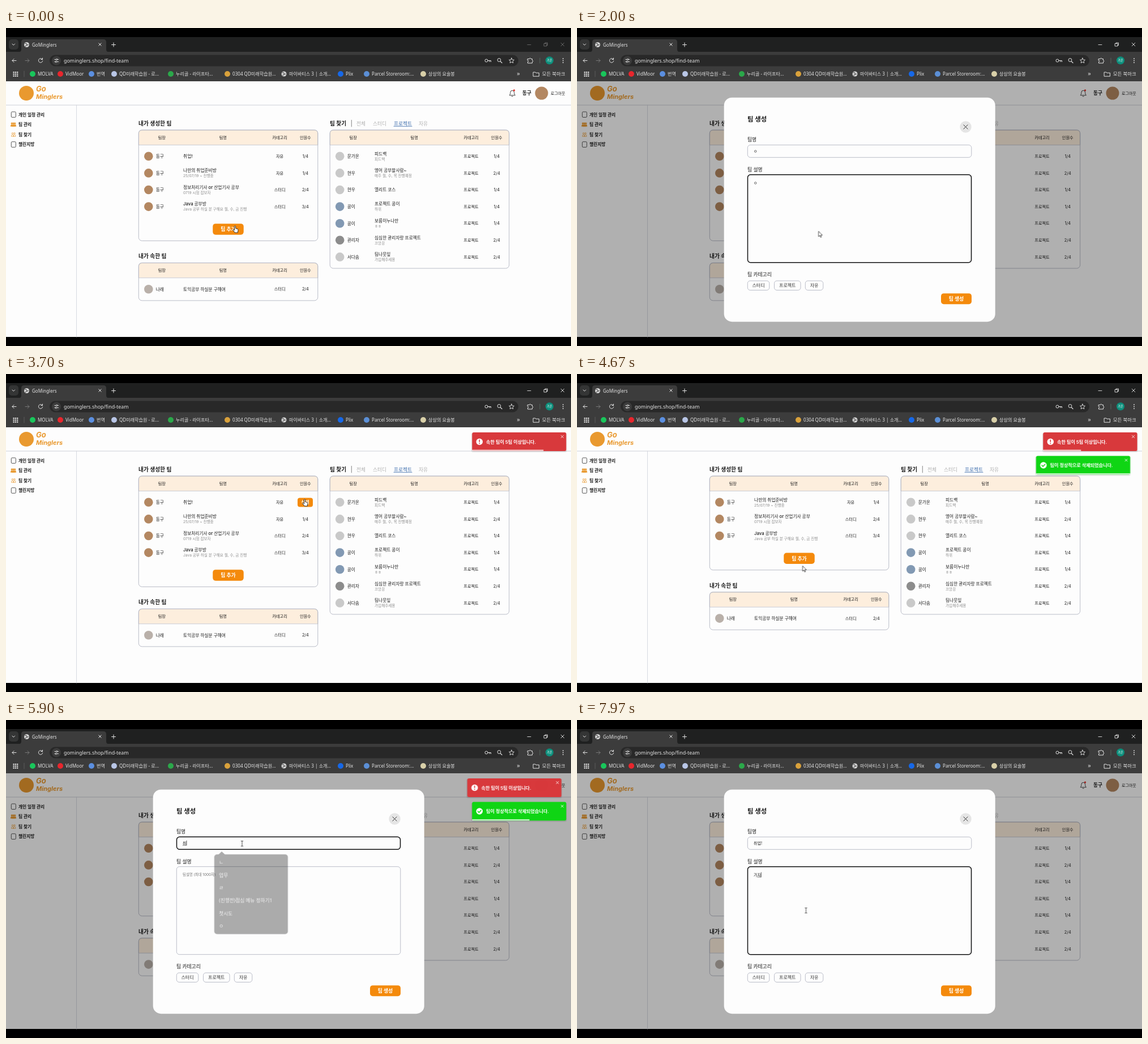
An HTML page that plays this animation: 998x561 px, repeating every 8000 ms.

```html
<!DOCTYPE html>
<html lang="ko">
<head>
<meta charset="utf-8">
<title>Find team</title>
<style>
  html, body { margin: 0; width: 100%; height: 100%; overflow: hidden; background: #000; }
  svg { display: block; width: 998px; height: 561px; }
  text { font-family: Inter, "Noto Sans CJK KR", "Noto Sans CJK", sans-serif; white-space: pre; }
  .ui { font-family: "Noto Sans", "Noto Sans CJK KR", "Noto Sans CJK", sans-serif; }
</style>
</head>
<body>
<script>
const LOOP = 8000;
const ORANGE = '#f48a0c', BRAND = '#e9992f', INK = '#1c1c1c', PAPER = '#fdfdfd', LINE = '#b3b6c2';
const SKIN = '#b38761', GREY = '#c9c9c9', BLUE = '#8299b3';
const MID = { 'text-anchor': 'middle' }, MEDIUM = { 'font-weight': 500 };
const SEMI = { 'font-weight': 600 }, BOLD = { 'font-weight': 700 };
const MODAL = [[150, 2560], [4860]];
const DELETED = 4250;

function el(parent, tag, attrs = {}, text) {
  const node = document.createElementNS('http://www.w3.org/2000/svg', tag);
  for (const key in attrs) node.setAttribute(key, attrs[key]);
  if (text !== undefined) node.textContent = text;
  return parent.appendChild(node);
}
const group = (parent, attrs) => el(parent, 'g', attrs);
const rect = (parent, x, y, width, height, fill, rx = 0, more = {}) =>
  el(parent, 'rect', { x, y, width, height, fill, rx, ...more });
const disc = (parent, cx, cy, r, fill, more = {}) => el(parent, 'circle', { cx, cy, r, fill, ...more });
const path = (parent, d, stroke, width = 1, fill = 'none') =>
  el(parent, 'path', { d, stroke, 'stroke-width': width, fill, 'stroke-linecap': 'round', 'stroke-linejoin': 'round' });
// y is the vertical middle of the line
const label = (parent, x, y, text, size, fill = INK, more = {}) =>
  el(parent, 'text', { x, y: y + size * 0.37, 'font-size': size, fill, ...more }, text);
const cross = (parent, x, y, r, color, width) =>
  path(parent, `M${x - r} ${y - r}L${x + r} ${y + r}M${x + r} ${y - r}L${x - r} ${y + r}`, color, width);

// steps: [ms, keyframe]; first and last values are held
function track(node, steps) {
  const frames = steps.map(([ms, frame]) => ({ ...frame, offset: ms / LOOP }));
  if (frames[0].offset > 0) frames.unshift({ ...frames[0], offset: 0, easing: 'linear' });
  if (frames.at(-1).offset < 1) frames.push({ ...frames.at(-1), offset: 1 });
  node.animate(frames, { duration: LOOP, iterations: Infinity });
  return node;
}
function show(node, ...ranges) {
  const hard = opacity => ({ opacity, easing: 'steps(1, end)' });
  const steps = ranges[0][0] > 0 ? [[0, hard(0)]] : [];
  for (const [from, to = LOOP] of ranges) {
    steps.push([from, hard(1)]);
    if (to < LOOP) steps.push([to, hard(0)]);
  }
  return track(node, steps);
}

const svg = el(document.body, 'svg', { viewBox: '0 0 998 561' });
rect(svg, 0, 0, 998, 561, '#000');
drawBrowser();
drawPage();
drawModal();
drawToast(103, '#d8393c', '속한 팀이 5팀 이상입니다.', '!', 2690, 3040, 5772);
const green = drawToast(144.5, '#0fd514', '팀이 정상적으로 삭제되었습니다.', '✓', 4286, 4831, 7571);
track(green, [[6200, { transform: 'translateY(0)', easing: 'ease' }], [6500, { transform: 'translateY(-41.5px)' }]]);
drawCursor();

function globe(parent, x, y) {
  disc(parent, x, y, 4.5, '#d5d5d5');
  path(parent, `M${x - 3} ${y - 2}q3 -1 3 1t3 1M${x - 2} ${y + 3}q1 -3 3 -2`, '#555', 1.2);
}

function drawBrowser() {
  const g = group(svg), W = '#e3e3e3', ui = { class: 'ui' };
  rect(g, 0, 16, 998, 27, '#1f2020');
  rect(g, 5, 20, 17, 18, '#343535', 5);
  path(g, 'M11 28l2.3 2.3l2.3 -2.3', W);
  path(g, 'M22 42.5q5 0 5 -5V25q0 -5 5 -5H172q5 0 5 5V37.5q0 5 5 5z', 'none', 0, '#3c3c3c');
  globe(g, 36.5, 29.5);
  label(g, 46, 30, 'GoMinglers', 8, W, ui);
  cross(g, 166, 29, 2.2, W);
  path(g, 'M186.5 29.5h7M190 26v7', W);
  const controls = color => {
    const c = group(g);
    path(c, 'M921 29.5h6', color, .9);
    path(c, 'M950.5 27.5h4.5v4.5h-4.5zM952 27.5v-1.5h4.5v4.5h-1.5', color, .9);
    cross(c, 983, 29, 2.8, color, .9);
    return c;
  };
  show(controls('#6d6d6d'), [0, 100]);
  show(controls(W), [100]);

  rect(g, 0, 42, 998, 52.5, '#3c3c3c');
  path(g, 'M18 57.5h-7m3 -3l-3 3l3 3', W);
  path(g, 'M34 57.5h7m-3 -3l3 3l-3 3', '#777');
  path(g, 'M64 55a3.7 3.7 0 1 0 .8 3M64.5 53v2.5h-2.5', W);
  rect(g, 77, 47.5, 828, 20, '#282828', 10);
  disc(g, 89, 57.5, 8, '#3c3c3c');
  path(g, 'M86 55.5h2M91 55.5h1.5M86 59.5h1M90 59.5h2.5', W);
  disc(g, 89.7, 55.5, 1.2, 'none', { stroke: W });
  disc(g, 88.3, 59.5, 1.2, 'none', { stroke: W });
  label(g, 102, 58, 'gominglers.shop/find-team', 8.9, W, ui);
  disc(g, 848.5, 57.5, 2.5, 'none', { stroke: W });
  path(g, 'M851 57.5h5.5v2M854 57.5v2', W);
  disc(g, 871, 56.5, 2.9, 'none', { stroke: W });
  path(g, 'M873.3 58.8l2.7 2.7', W, 1.2);
  path(g, 'M893 53l1.3 3l3.2 .3l-2.4 2.2l.7 3.2l-2.8 -1.7l-2.8 1.7l.7 -3.2l-2.4 -2.2l3.2 -.3z', W, .9);
  path(g, 'M921.5 54.5h3a1.3 1.3 0 0 1 2.6 0h2.4v2.6a1.3 1.3 0 0 1 0 2.6v2.3h-8v-2.3a1.3 1.3 0 0 0 0 -2.6z', W);
  path(g, 'M943 53v9', '#5d6f68', .8);
  disc(g, 960, 57.3, 7, '#0c8f7c');
  label(g, 960, 57.3, '가온', 5.2, '#fff', MID);
  for (const y of [54, 57.5, 61]) disc(g, 984, y, .9, W);

  for (let i = 0; i < 9; i++) rect(g, 12.5 + i % 3 * 3.3, 77 + (i / 3 | 0) * 3.3, 2.2, 2.2, W);
  path(g, 'M32 76v10', '#666', .8);
  const bookmarks = [
    [47, '#19c65b', 'MOLVA'], [96, '#e8262d', 'VidMoor'], [151, '#5b8fe0', '번역'],
    [191, '#b9c6e6', 'QD미래학습원 - 로...'], [291, '#2ba84a', '누리골 - 라이프타...'],
    [391, '#d9a13b', '0304 QD미래학습원...'], [491, null, '마이바티스 3 | 소개...'],
    [591, '#1668e8', 'Plix'], [637, '#5b8fd6', 'Parcel Storeroom:...'], [737, '#d8cfa8', '상상의 요술봉']
  ];
  for (const [x, color, name] of bookmarks) {
    if (color) disc(g, x, 81, 5, color); else globe(g, x, 81);
    label(g, x + 9, 81, name, 8.1, W, ui);
  }
  label(g, 905, 80, '»', 11, W, { ...ui, ...MID });
  path(g, 'M931.5 78h3.5l1 1.2h5.5v6h-10z', W);
  label(g, 947, 81, '모든 북마크', 8.4, W, ui);
}

function button(parent, cx, cy, w, h, text, size) {
  const g = group(parent);
  rect(g, cx - w / 2, cy - h / 2, w, h, ORANGE, Math.min(5, h / 4));
  label(g, cx, cy, text, size, '#fff', { ...MID, ...BOLD });
  return g;
}

// team: [leader, avatar colour, name, note, category, members]
function table(parent, x, y, height, teams) {
  rect(parent, x, y, 316.5, height, PAPER, 6);
  path(parent, `M${x} ${y + 26}v-20q0 -6 6 -6h304.5q6 0 6 6v20z`, LINE, .7, '#fdeedd');
  rect(parent, x, y, 316.5, height, 'none', 6, { stroke: LINE, 'stroke-width': .9 });
  [[41, '팀장'], [149, '팀명'], [249.3, '카테고리'], [294.5, '인원수']].forEach(([dx, name]) =>
    label(parent, x + dx, y + 13, name, 7.2, INK, { ...MID, ...MEDIUM }));
  teams.forEach(([leader, color, name, note, category, members], i) => {
    const cy = y + 46.3 + i * 29.6;
    disc(parent, x + 17.5, cy, 7.8, color);
    label(parent, x + 30.5, cy, leader, 7.7, INK, MEDIUM);
    label(parent, x + 78.8, note ? cy - 4.5 : cy, name, 7.7, INK, MEDIUM);
    if (note) label(parent, x + 78.8, cy + 4.8, note, 6.6, '#8d8d8d');
    label(parent, x + 249.3, cy, category, 7.2, INK, MID);
    label(parent, x + 294.5, cy, members, 7.3, INK, MID);
  });
}

function leftColumn(parent, teams) {
  const g = group(parent), end = 257 + teams.length * 29.6;
  label(g, 234, 168.3, '내가 생성한 팀', 9.7, INK, SEMI);
  table(g, 234.3, 180, end - 180, teams);
  button(g, 392.5, end - 20.5, 54.5, 19.5, '팀 추가', 8.9);
  label(g, 234, end + 27.5, '내가 속한 팀', 9.7, INK, SEMI);
  table(g, 234.3, end + 39, 66.5, [['나래', '#b9b0a9', '토익공부 하실분 구해여', '', '스터디', '2/4']]);
  return g;
}

function drawPage() {
  const g = group(svg);
  rect(g, 0, 94, 998, 451, PAPER);
  path(g, 'M0 136h998', '#c9cbd4', .9);
  path(g, 'M124.5 136v409', '#d3d5dd', .9);
  disc(g, 36, 115, 13, BRAND);
  const italic = { ...BOLD, 'font-style': 'italic' };
  label(g, 53, 107, 'Go', 13, BRAND, italic);
  label(g, 53, 121, 'Minglers', 11, BRAND, italic);

  path(g, 'M889.5 118.5q1.5 -1 1.5 -5a3.3 3.3 0 0 1 6.6 0q0 4 1.5 5zM893 120.5q1.2 1 2.4 0', '#333', .9);
  disc(g, 897.5, 110, 1.7, '#e53935');
  label(g, 912, 115, '동구', 8.7, INK, BOLD);
  disc(g, 946, 115, 11.5, SKIN);
  label(g, 962, 115, '로그아웃', 7);

  ['개인 일정 관리', '팀 관리', '팀 찾기', '챌린지방'].forEach((name, i) => {
    const y = 152.7 + i * 17.6;
    label(g, 22, y, name, 7.7, INK, BOLD);
    if (i % 3 === 0) {
      rect(g, 9.3, y - 4.8, 8, 9.6, 'none', 1.5, { stroke: '#444', 'stroke-width': .9 });
      return;
    }
    const fill = i === 1 ? BRAND : 'none';
    for (const x of i === 1 ? [10.3, 13, 15.7] : [11.5, 15]) {
      disc(g, x, y - 2, 1.3, fill, { stroke: BRAND, 'stroke-width': .7 });
      path(g, `M${x - 2} ${y + 3}q0 -3 2 -3t2 3z`, BRAND, .7, fill);
    }
  });

  const teams = [
    ['동구', SKIN, '취업!', '', '자유', '1/4'],
    ['동구', SKIN, '나만의 취업준비방', '25/07/19 ~ 진행중', '자유', '1/4'],
    ['동구', SKIN, '정보처리기사 or 산업기사 공부', '0719 시험 잡보자', '스터디', '2/4'],
    ['동구', SKIN, 'Java 공부방', 'Java 공부 하실 분 구해요 월, 수, 금 진행', '스터디', '3/4']
  ];
  show(leftColumn(g, teams), [0, DELETED]);
  show(leftColumn(g, teams.slice(1)), [DELETED]);

  label(g, 572, 168.3, '팀 찾기', 9.7, INK, SEMI);
  path(g, 'M610.3 162.5v11.5', '#777', .9);
  [[627, '전체'], [660, '스터디'], [701, '프로젝트'], [737, '자유']].forEach(([x, name], i) =>
    label(g, x, 168.5, name, 8.7, i === 2 ? '#3f6fae' : '#b0b0b0', MID));
  path(g, 'M685 173.5h32', '#3f6fae', .8);
  const P = '프로젝트';
  table(g, 572.2, 180, 244, [
    ['문가온', GREY, '피드백', '피드백', P, '1/4'],
    ['현우', GREY, '영어 공부할사람~', '매주 월, 수, 목 진행예정', P, '2/4'],
    ['현우', GREY, '엘리트 코스', '', P, '1/4'],
    ['콩이', BLUE, '프로젝트 콩이', '하위', P, '1/4'],
    ['콩이', BLUE, '보름이누나만', 'ㅎㅎ', P, '1/4'],
    ['관리자', '#8c8c8c', '심심한 관리자랑 프로젝트', '끄앙끙', P, '2/4'],
    ['서다솜', GREY, '팀나뭇잎', '가입해주세용', P, '2/4']
  ]);
  show(button(g, 866.5, 404, 27, 16, '신청', 7.6), [2600, 2740]);
  show(button(g, 528.5, 226.5, 27, 16, '삭제', 7.6), [3200, DELETED]);
}

function field(parent, y, height, focusRanges) {
  rect(parent, 301.3, y, 395.5, height, PAPER, 5, { stroke: LINE, 'stroke-width': .9 });
  show(rect(parent, 301.5, y, 395, height, 'none', 5, { stroke: '#141414', 'stroke-width': 1.5 }), ...focusRanges);
}

// the underline marks the syllable still being composed
function typed(parent, y, text, from, to, composing) {
  const g = group(parent), size = 7, end = 312 + text.length * size * .92;
  label(g, 312, y, text, size);
  if (composing) {
    path(g, `M${end - 6.3} ${y + 4}h6`, INK, .6);
    path(g, `M${end + .5} ${y - 4}v8`, INK, .7);
  }
  show(g, [from, to]);
}

function drawModal() {
  const g = show(group(svg), ...MODAL);
  rect(g, 0, 94, 998, 451, '#000', 0, { opacity: .3 });
  rect(g, 259.7, 122.7, 479, 395.5, PAPER, 14);
  label(g, 301, 161, '팀 생성', 11.4, INK, BOLD);
  disc(g, 686.5, 174.5, 10.2, '#e5e5e5');
  cross(g, 686.5, 174.5, 3.6, '#333', 1);
  label(g, 301, 197, '팀명', 8.8, INK, MEDIUM);
  field(g, 206.3, 22, [[700, 1650], [5300, 7200]]);
  label(g, 301, 249.5, '팀 설명', 8.8, INK, MEDIUM);
  field(g, 258.7, 155, [[1700, 2150], [7200]]);

  show(label(g, 312, 217, '팀명(최대100자)', 6.4, '#777'), [0, 1350], [4860, 5700]);
  show(label(g, 312, 273, '팀설명 (최대 1000자)', 6.4, '#777'), [0, 1850], [4860, 7500]);
  typed(g, 217, 'ㅇ', 1350, 2560);
  typed(g, 273, 'ㅇ', 1850, 2560);
  typed(g, 217, 'ㅊ', 5700, 5800, true);
  typed(g, 217, '취', 5800, 6200, true);
  typed(g, 217, '취어', 6200, 6400, true);
  typed(g, 217, '취업', 6400, 6850, true);
  typed(g, 217, '취업!', 6850, LOOP);
  typed(g, 273, 'ㄱ', 7500, 7600, true);
  typed(g, 273, '가', 7600, 7850, true);
  typed(g, 273, '가자', 7850, LOOP, true);

  label(g, 301, 435, '팀 카테고리', 8.8, INK, MEDIUM);
  [[301.3, 38.5, '스터디'], [348.5, 46.5, '프로젝트'], [403.3, 31.5, '자유']].forEach(([x, w, name]) => {
    rect(g, x, 446, w, 16.5, PAPER, 4.5, { stroke: LINE, 'stroke-width': .9 });
    label(g, x + w / 2, 454.3, name, 8, '#333', MID);
  });
  show(button(g, 419, 454.3, 31.5, 16.5, '자유', 8), [2200, 2560]);
  button(g, 670, 477.7, 54, 19, '팀 생성', 8.9);

  const popup = group(g, { style: 'transform-origin: 432.5px 307px' });
  path(popup, 'M372.5 235l6.5 -6l6.5 6z', 'none', 0, '#1e1e1f');
  rect(popup, 365.3, 234.3, 135.2, 146.2, '#1e1e1f', 5);
  ['ㄴ', '업무', 'ㄹ', '(진행전)점심 메뉴 정하기1', '첫시도', 'ㅇ'].forEach((name, i) =>
    label(popup, 374, 249 + i * 23.3, name, 9, '#ececec', { class: 'ui' }));
  const hidden = { opacity: 0, transform: 'scale(.95)' }, open = { opacity: 1, transform: 'scale(1)' };
  track(popup, [[760, hidden], [860, open], [1400, open], [1500, hidden], [5380, hidden], [5480, open],
    [5840, open], [5900, { opacity: .38, transform: 'scale(.962)' }], [5940, hidden]]);
}

function drawToast(y, color, message, mark, enter, countFrom, leave) {
  const slot = group(svg), g = group(slot);
  rect(g, 822, y + 1, 168.5, 34, '#000', 3, { opacity: .1 });
  rect(g, 823.3, y, 166.3, 33, color, 3);
  disc(g, 836.3, y + 16.5, 5.8, '#fff');
  if (mark === '!') {
    path(g, `M836.3 ${y + 13.3}v3.5`, color, 1.5);
    disc(g, 836.3, y + 19.5, .9, color);
  } else path(g, `M833.5 ${y + 16.5}l2 2.2l3.6 -4`, color, 1.5);
  label(g, 848, y + 16.8, message, 8.1, '#fff', SEMI);
  cross(g, 982.5, y + 7.5, 2, '#fff', .9);
  const bar = rect(g, 823.3, y + 30.5, 166.3, 2.5, '#fff', 0,
    { opacity: .7, style: 'transform-box: fill-box; transform-origin: left' });
  track(bar, [[countFrom, { transform: 'scaleX(1)' }], [leave, { transform: 'scaleX(0)' }]]);

  const at = (x, opacity = 1, easing = 'cubic-bezier(.215, .61, .355, 1)') =>
    ({ transform: `translateX(${x}px)`, opacity, easing });
  track(g, [
    [enter, at(1560, 0)], [enter + 384, at(-13)], [enter + 480, at(5)], [enter + 576, at(-2.6)], [enter + 640, at(0)],
    [leave, at(0, 1, 'ease')], [leave + 128, at(-10, 1, 'ease')], [leave + 425, at(1040, 0)]
  ]);
  return slot;
}

function drawCursor() {
  const g = group(svg);
  const arrow = group(g), hand = group(g), beam = group(g);
  path(arrow, 'M0 0v9l2.2 -2l1.5 3.3l1.5 -.7l-1.5 -3.2h2.8z', '#222', .8, '#fff');
  path(hand, 'M-1.5 -5.5q1 -1.2 2 0v4l3.5 1q1.2 .5 1 2l-.7 4.5h-5l-3.5 -4.5q0 -1.5 1.5 -.8l1.2 1z', '#222', .9, '#fff');
  path(beam, 'M-1.7 -4.5h1.2l.5 .5l.5 -.5h1.2M0 -4v8M-1.7 4.5h1.2l.5 -.5l.5 .5h1.2', '#222', .8);
  show(hand, [0, 200], [2100, 2570], [3300, DELETED], [4740, 4900]);
  show(beam, [560, 2000], [5200]);
  show(arrow, [200, 560], [2000, 2100], [2570, 3300], [DELETED, 4740], [4900, 5200]);
  const stops = [
    [0, 405, 355], [200, 405, 355], [700, 442, 217], [1400, 442, 217], [1650, 430, 300], [1900, 430, 310],
    [2150, 420, 455], [2230, 420, 455], [2480, 670, 478], [2550, 670, 478], [2700, 605, 383], [3300, 528, 227],
    [4200, 528, 227], [4670, 398.5, 339], [4780, 396, 327], [4880, 396, 327], [5300, 417, 218],
    [5900, 417, 218], [6530, 415, 218], [6900, 415, 218], [7200, 404.5, 336]
  ];
  track(g, stops.map(([ms, x, y]) => [ms, { transform: `translate(${x}px, ${y}px)`, easing: 'ease-in-out' }]));
}
</script>
</body>
</html>
```
